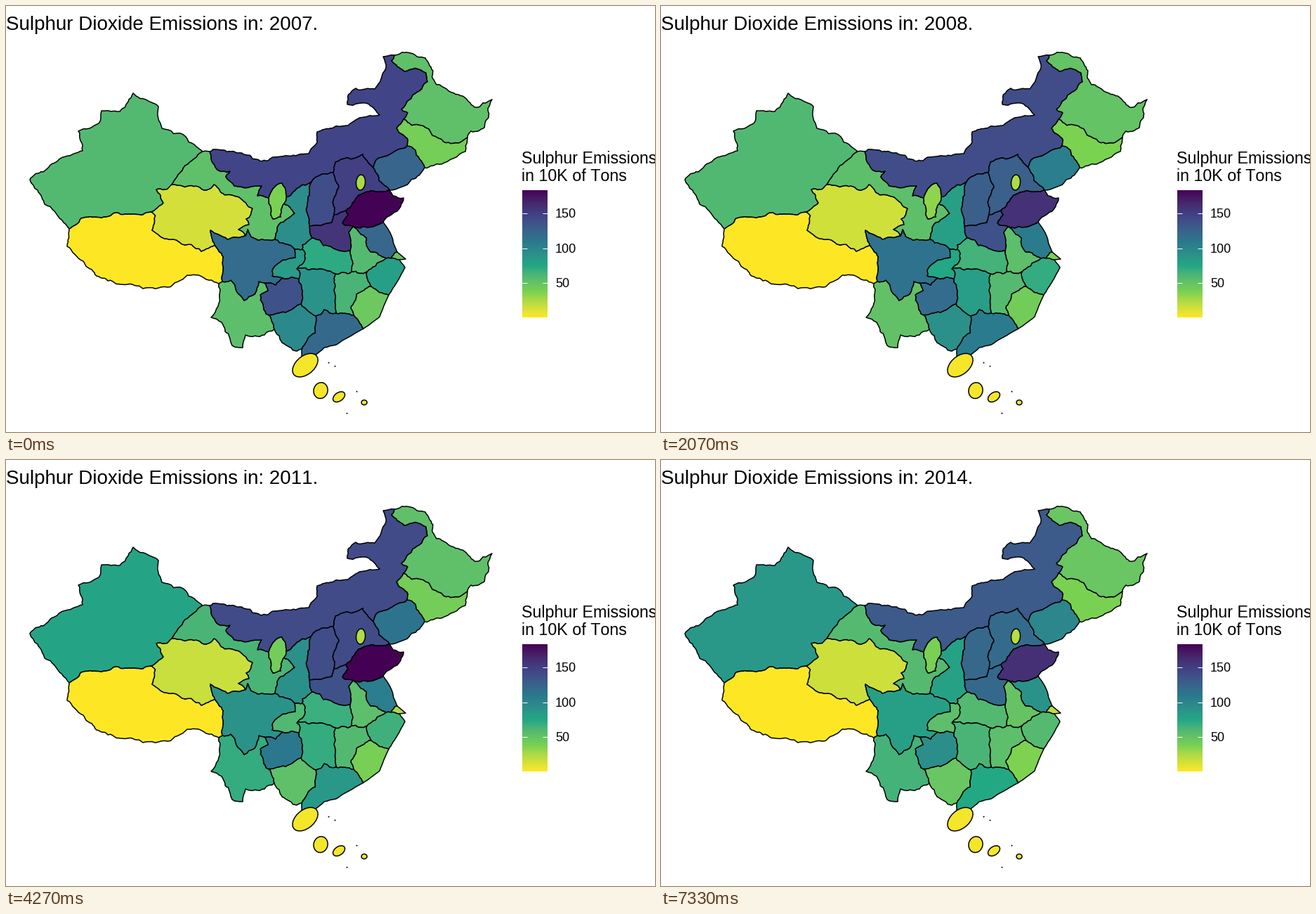
These frames come from a looping animation (924x606 px, 8 s). A matplotlib script:

```python
import numpy as np
import matplotlib.pyplot as plt
from matplotlib.animation import FuncAnimation
from matplotlib.collections import PolyCollection
from matplotlib.colors import ListedColormap, to_rgb

W, H, DPI = 924, 606, 100
PX = 72 / DPI
LOOP, INTERVAL = 8000, 20
LOW, HIGH = 0.2, 182.7
MAP_TIMES = (1000, 2070, 3130, 4200, 5270, 6330, 7270)
TITLE_TIMES = (1070, 2130, 3200, 4270, 5330, 6400, 7330)

plt.rcParams["font.family"] = "Liberation Sans"
plt.rcParams["text.kerning_factor"] = 6  # plain advances, no kerning
rng = np.random.default_rng(7)

fig = plt.figure(figsize=(W / DPI, H / DPI), dpi=DPI, facecolor="white")
ax = fig.add_axes([0, 0, 1, 1])
ax.axis("off")


def lab_ramp(stops, n=512):
    """Blend colours through the cube roots of XYZ, which is linear in Lab."""
    m = np.array([[.4124, .3576, .1805], [.2126, .7152, .0722], [.0193, .1192, .9505]])
    rgb = np.array([to_rgb(s) for s in stops])
    linear = np.where(rgb > .04045, ((rgb + .055) / 1.055) ** 2.4, rgb / 12.92)
    roots = np.cbrt(linear @ m.T)
    t = np.linspace(0, len(stops) - 1, n)
    roots = np.column_stack([np.interp(t, range(len(stops)), c) for c in roots.T])
    linear = (roots ** 3 @ np.linalg.inv(m).T).clip(0, 1)
    return ListedColormap(np.where(linear > .0031308,
                                   1.055 * linear ** (1 / 2.4) - .055, linear * 12.92))


cmap = lab_ramp(plt.get_cmap("viridis")(np.linspace(1, 0, 6))[:, :3])

# points where borders meet
NODES = dict(
    a=(280, 207), b=(236, 254), c=(207, 293), d=(90, 317), e=(297, 340),
    f=(308, 392), g=(303, 395), h=(382, 460), i=(370, 438), j=(368, 394),
    k=(394, 387), l=(417, 388), m=(420, 424), n=(441, 441), o=(421, 488),
    p=(470, 437), q=(495, 440), r=(509, 459), s=(520, 399), t=(545, 411),
    u=(514, 378), v=(541, 359), w=(548, 359), x=(560, 361), y=(557, 350),
    z=(537, 307), A=(495, 314), B=(490, 348), C=(492, 378), D=(469, 381),
    E=(414, 374), F=(422, 346), G=(411, 346), H=(383, 332), I=(341, 327),
    J=(399, 272), K=(396, 281), L=(374, 273), M=(290, 207), N=(435, 250),
    O=(432, 313), P=(436, 330), Q=(467, 297), R=(484, 291), S=(466, 237),
    T=(523, 230), U=(546, 262), V=(571, 199), W=(566, 161), X=(553, 70),
    Y=(657, 187), Z=(596, 230))
borders = {}
shapes, trends = [], []


def ragged(p, q, rough):
    """Split a segment again and again, pushing each midpoint sideways."""
    d = q - p
    if np.hypot(*d) < 5:
        return [p]
    mid = (p + q) / 2 + rng.normal(0, rough) * np.array([-d[1], d[0]])
    return ragged(p, mid, rough) + ragged(mid, q, rough)


def border(ends, *xy, rough=0.08):
    """Run a border between two nodes by way of a few key points."""
    start, end = (NODES[n] for n in ends)
    pts = np.vstack([start, np.reshape(xy, (-1, 2)), end]).astype(float)
    line = [pt for p, q in zip(pts, pts[1:]) for pt in ragged(p, q, rough)]
    borders[ends] = np.array(line + [pts[-1]])
    borders[ends[::-1]] = borders[ends][::-1]


def trend(first, second):
    """Yearly values: a slowing run up to 2010, then a steady one from 2011."""
    s = np.arange(4) / 3
    early = first[0] + (first[1] - first[0]) * (1 - (1 - s) ** 1.7)
    late = second[0] + (second[1] - second[0]) * s
    return np.r_[early, late]


def region(loop, first, second):
    """Fill the area inside a loop of nodes."""
    pairs = [p + q for p, q in zip(loop, loop[1:] + loop[0])]
    for ends in pairs:
        if ends not in borders:
            border(ends)
    shapes.append(np.vstack([borders[ends] for ends in pairs]))
    trends.append(trend(first, second))


def blob(cx, cy, rx, ry, tilt, first, second):
    a, c = np.linspace(0, 2 * np.pi, 24, endpoint=False), np.radians(tilt)
    x, y = rx * np.cos(a), ry * np.sin(a)
    shapes.append(np.column_stack([cx + x * np.cos(c) - y * np.sin(c),
                                   cy + x * np.sin(c) + y * np.cos(c)]))
    trends.append(trend(first, second))


# west
border("da", 69, 292, 55, 282, 45, 262, 34, 247, 53, 236, 85, 214, 109, 206, 103, 178,
       132, 167, 136, 149, 162, 150, 174, 136, 181, 124, 217, 143, 222, 174, 256, 186)
border("ab", 255, 227)
border("bc", 214, 261, 224, 280)
border("cd", 157, 294, 107, 302)
border("dg", 87, 342, 110, 363, 145, 391, 195, 402, 230, 400, 258, 383, 289, 390)
border("ce", 208, 319, 247, 336, 278, 349)
border("ef", 307, 352)
border("eI", 291, 319, 315, 332)
border("bI", 285, 262, 296, 254, 332, 272, 351, 288, 342, 303, 346, 311, 331, 318)
border("IH", 344, 318, 358, 333)
border("HK", 389, 310, 411, 295)
border("KL", 391, 300, 380, 303)
border("LJ", 386, 254, 393, 252)
border("LM", 358, 270, 364, 256, 325, 256, 313, 243, 319, 235, 300, 232)

# north
border("MX", 330, 209, 373, 220, 431, 210, 443, 194, 443, 179, 487, 170, 510, 158,
       532, 155, 517, 140, 486, 140, 498, 117, 525, 118, 541, 88, 537, 72)
border("XW", 549, 78, 567, 93, 598, 95, 592, 118, 563, 147, 572, 152)
border("XY", 576, 67, 597, 74, 613, 112, 650, 128, 667, 144, 692, 133, 681, 173, 662, 178)
border("WY", 592, 170, 607, 184, 623, 193, 637, 195)
border("YZ", 654, 207, 620, 225)
border("WV", 556, 174, 571, 188)
border("VZ", 583, 205)
border("VT", 543, 213, 527, 219)
border("ZU", 577, 247)
border("TU", 530, 241)
border("TS", 514, 220, 508, 211, 485, 216, 469, 222)
border("SN", 450, 239)
border("NJ", 417, 258)
border("NO", 430, 275)
border("SQ", 474, 257, 466, 277)
border("RU", 502, 269, 522, 263)
border("Uz", 551, 270, 566, 273, 562, 285)

# centre
border("OQ", 464, 308)
border("RA", 487, 297, 479, 309)
border("Az", 515, 315)
border("PB", 452, 341, 474, 348)
border("AB", 488, 322, 491, 333)
border("Av", 513, 330, 519, 350)
border("PF", 422, 340)
border("FE", 426, 352)
border("Gk", 412, 358, 380, 374, 379, 384)
border("ED", 438, 374)
border("uv", 526, 370)

# south and coast
border("yx", 569, 360, rough=0)
border("zy", 548, 325, rough=0.02)
border("xt", 568, 372, 556, 394, rough=0.02)
border("tr", 532, 442, rough=0.02)
border("ro", 470, 482, 453, 486, 440, 497, 421, 498, rough=0.02)
border("sq", 499, 410, 491, 430)
border("Dp", 467, 405)
border("pn", 453, 432)
border("nm", 430, 434)
border("no", 440, 465)
border("jk", 384, 397)
border("mi", 398, 436)
border("ij", 366, 425, 362, 411, 373, 405)
border("fj", 320, 390, 339, 419, 354, 410, 360, 392)
border("ih", 378, 448)
border("gh", 302, 427, 292, 443, 307, 450, 322, 483, 337, 486, 341, 468, 368, 468)
border("ho", 393, 479, 414, 491)

# emissions at both ends of 2007-2010 and of 2011-2014
region("abcd", (58, 59), (76, 85))
region("dcefg", (0.2, 0.4), (0.4, 0.4))
region("bceI", (13, 14), (16, 15))
region("abIHKLM", (52, 53), (62, 57))
region("LJK", (37, 31), (41, 38))
region("JNOPFGHK", (93, 78), (92, 78))
region("MLJNSTVWX", (146, 139), (141, 131))
region("NSQO", (139, 125), (140, 121))
region("STURQ", (149, 123), (141, 119))
region("TVZU", (123, 102), (113, 99))
region("VWYZ", (40, 36), (41, 37))
region("WXY", (52, 49), (52, 47))
region("RUzA", (182, 154), (182.7, 159))
region("OQRABP", (156, 133), (137, 120))
region("Azywv", (122, 105), (105, 90))
region("yxw", (50, 36), (24, 19))
region("vwxtsu", (80, 68), (66, 57))
region("AvuCB", (57, 53), (53, 49))
region("strq", (45, 41), (39, 36))
region("CusqpD", (62, 56), (58, 53))
region("PBCDEF", (71, 63), (67, 58))
region("DpnmlE", (90, 80), (69, 62))
region("npqro", (120, 105), (85, 73))
region("imnoh", (97, 90), (52, 47))
region("ijklm", (137, 115), (110, 93))
region("gfjih", (53, 50), (69, 64))
region("eIHGkjf", (118, 113), (90, 80))
region("GFElk", (83, 72), (59, 53))

# enclave and islands
blob(505, 251, 6.5, 11, 5, (24.5, 23.5), (23, 21))
for island in ((426, 511, 21, 13, -40), (448, 547, 10, 11.5, 15),
               (474, 556, 9.5, 6, -35), (510, 564, 4, 3.5, 0)):
    blob(*island, (2.6, 2.9), (3.3, 3.3))
ax.plot([459, 468, 499, 485], [507, 512, 548, 579], "ko", ms=2 * PX, mew=0)

provinces = PolyCollection(shapes, edgecolors="black", linewidths=1.5 * PX,
                           joinstyle="round")
ax.add_collection(provinces)
trends = np.array(trends)


def label(x, y, text, px):
    return ax.text(x, y, text, fontsize=px * PX, color="black", va="baseline")


# legend
ax.imshow(np.linspace(1, 0, 181)[:, None], cmap=cmap, vmin=0, vmax=1,
          extent=(735, 771, 443, 262), aspect="auto", interpolation="nearest")
for value in (50, 100, 150):
    y = 443.5 - 0.99 * value
    for x in (735, 763.8):
        ax.plot([x, x + 7.2], [y, y], color="white", lw=PX, solid_capstyle="butt")
    label(782, y + 6.3, str(value), 18)
label(734, 224, "Sulphur Emissions", 23.3)
label(734, 249, "in 10K of Tons", 23.3)
title = label(0, 34, "", 27.7)

ax.set_xlim(0, W)
ax.set_ylim(H, 0)


def update(k):
    now = k * INTERVAL + INTERVAL / 2
    step = sum(now >= t for t in MAP_TIMES)
    year = 2007 + sum(now >= t for t in TITLE_TIMES)
    provinces.set_facecolor(cmap((trends[:, step] - LOW) / (HIGH - LOW)))
    title.set_text(f"Sulphur Dioxide Emissions in: {year}.")
    return provinces, title


anim = FuncAnimation(fig, update, frames=LOOP // INTERVAL, interval=INTERVAL,
                     init_func=lambda: update(0), repeat=True, repeat_delay=0)
plt.show()
```
